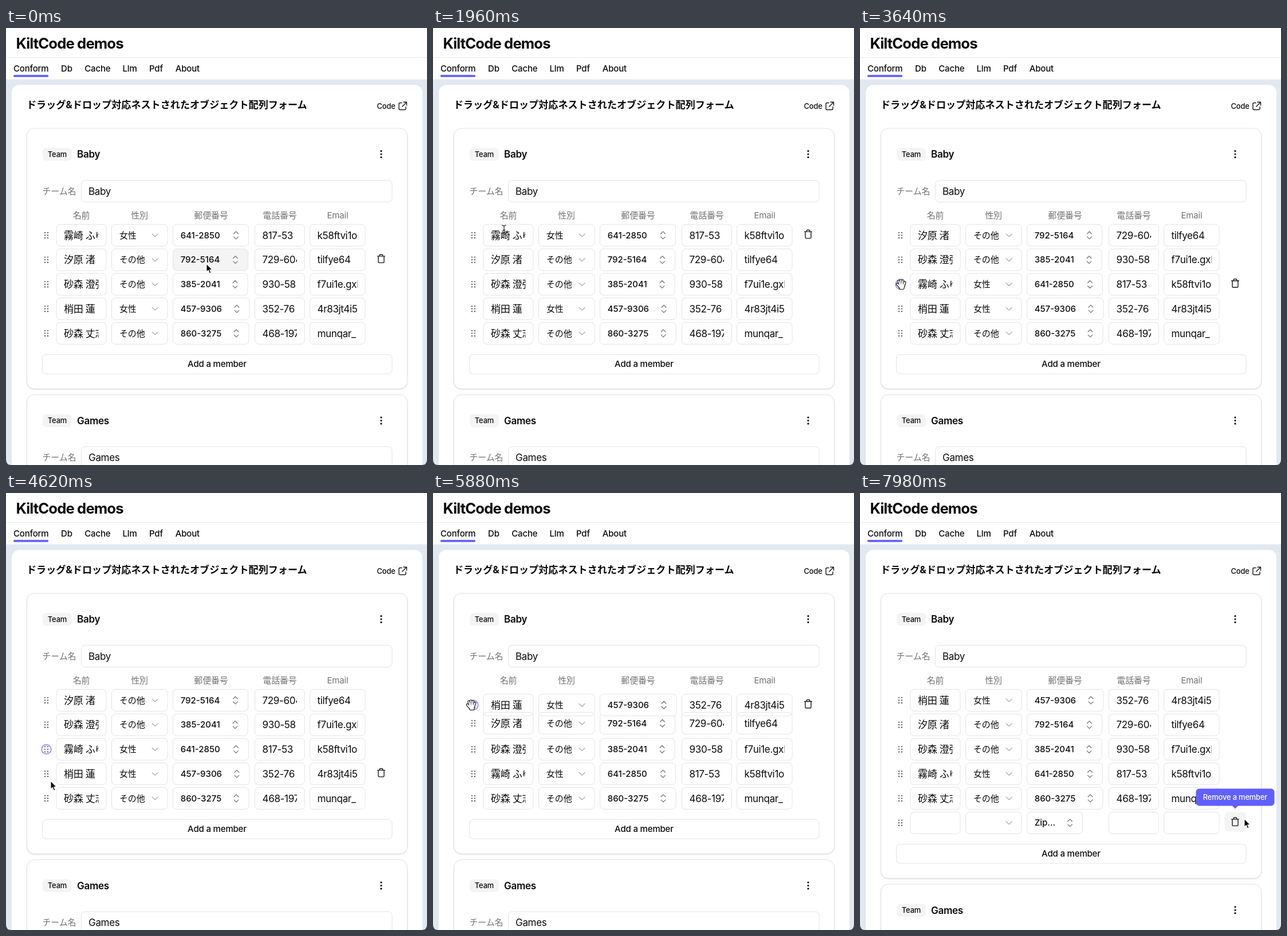
These frames come from a looping animation (735x762 px, 8000 ms). An HTML page:

```html
<!DOCTYPE html>
<html lang="ja">
<head>
<meta charset="utf-8">
<title>Sortable nested form</title>
<style>
  html, body { margin: 0; width: 100%; height: 100%; overflow: hidden; background: #e2e8f0; }
  svg { display: block; }
  text { font: 15px Inter, 'Noto Sans CJK JP', 'Noto Sans CJK', sans-serif; letter-spacing: -.012em; fill: #0a0a0a; white-space: pre; }
  .title { font-size: 25.7px; font-weight: 700; letter-spacing: -.035em; }
  .heading { font-size: 17.1px; font-weight: 700; letter-spacing: 0; }
  .team { font-size: 17.1px; font-weight: 600; letter-spacing: -.02em; }
  .value { font-size: 17.1px; letter-spacing: -.022em; }
  .medium { font-weight: 500; }
  .zip { font-weight: 500; letter-spacing: 0; }
  .small { font-size: 12.9px; font-weight: 500; }
  .label { fill: #737373; }
  .mid { text-anchor: middle; }
  .box { fill: none; stroke: #e4e4e7; }
  .button { fill: #fff; }
  .hover { fill: #f4f4f5; }
  .card { fill: #fff; stroke: #e4e4e7; filter: drop-shadow(0 1px 1px #0002); }
  .icon { fill: none; stroke: #18181b; stroke-width: 1.4; stroke-linecap: round; stroke-linejoin: round; }
  .cursor { stroke-linejoin: round; stroke-linecap: round; }
</style>
</head>
<body>
<svg id="stage" width="735" height="762" viewBox="0 0 735 762"></svg>
<script>
const LOOP = 8000, STEP = 70, PITCH = 42.75, TOP = 361.4;
const ACCENT = '#615fff', ADDED_AT = 7210;
const slotY = slot => TOP + slot * PITCH;

// Later members are painted above earlier ones.
// moves: [time, slot]; drag: [start, end] while the row follows the pointer.
const members = [
  { name: '霧崎 ふゆ', gender: '女性', zip: '641-2850', zipWidth: 132, phone: '817-53', email: 'k58ftvi1o',
    moves: [[0, 0], [3500, 2], [5465, 3]], drag: [2870, 3710], ring: [2730, 5250] },
  { name: '汐原 渚', gender: 'その他', zip: '792-5164', zipWidth: 131, phone: '729-604', email: 'tilfye64',
    moves: [[0, 1], [2980, 0], [5740, 1]] },
  { name: '砂森 澄弥', gender: 'その他', zip: '385-2041', zipWidth: 130.5, phone: '930-58', email: 'f7ui1e.gxl',
    moves: [[0, 2], [3220, 1], [5600, 2]] },
  { name: '梢田 蓮', gender: '女性', zip: '457-9306', zipWidth: 133.5, phone: '352-76', email: '4r83jt4i5',
    moves: [[0, 3], [5900, 0]], drag: [5320, 6160], ring: [5250, ADDED_AT] },
  { name: '砂森 丈志', gender: 'その他', zip: '860-3275', zipWidth: 132.5, phone: '468-197', email: 'munqar_',
    moves: [[0, 4]] },
  { name: '', gender: '', zip: 'Zip...', zipWidth: 97, phone: '', email: '', moves: [[0, 5]], from: ADDED_AT },
];

// Pointer path: [time, x, y]
const path = [
  [0, 350, 411], [420, 350, 411], [910, 245, 388], [1050, 245, 388], [1820, 126, 356], [1960, 124, 351],
  [2100, 124, 351], [2590, 72, 361.4], [2870, 72, 361.4], [3080, 72, 418], [3500, 72, 447], [3780, 72, 447],
  [3920, 73, 450], [4130, 73, 450], [4340, 82, 461], [4480, 82, 461], [4620, 78, 502], [4760, 78, 502],
  [4830, 77, 500], [4970, 77, 500], [5250, 69, 489.6], [5340, 69, 489.6], [5600, 66, 424], [5950, 67, 364],
  [6160, 68, 361.4], [6300, 74, 368], [6440, 74, 368], [6650, 232, 562], [6860, 232, 562], [7070, 300, 584],
  [7490, 300, 584], [7980, 671, 568],
];

const text = (x, y, content, cls = '') => `<text x="${x}" y="${y}" class="${cls}">${content}</text>`;
const rect = (x, y, w, h, r, cls) => `<rect x="${x}" y="${y}" width="${w}" height="${h}" rx="${r}" class="${cls}"/>`;
const icon = (d, attrs = '') => `<path class="icon" d="${d}" ${attrs}/>`;
const dots = (points, r, fill) => points.map(([x, y]) => `<circle cx="${x}" cy="${y}" r="${r}" fill="${fill}"/>`).join('');

const input = (x, w, value) => rect(x, -19, w, 38, 6.5, 'box') +
  `<svg x="${x + 13}" y="-18" width="${w - 26.5}" height="36">${text(0, 24.3, value, 'value')}</svg>`;

const teamHeader = name =>
  rect(64, 209, 51, 22.5, 6.5, 'hover') + text(89.5, 224.7, 'Team', 'small mid') +
  text(124, 226.3, name, 'team') + dots([[655, 214.6], [655, 220], [655, 225.4]], 1.6, '#0a0a0a') +
  text(63.5, 289.7, 'チーム名', 'label') + rect(131.5, 265.5, 542.5, 38, 6.5, 'box') + text(144, 290.7, name, 'value');

function memberRow(m) {
  const arrows = 291.5 + m.zipWidth - 22;
  const grip = [-4.6, 0, 4.6].flatMap(y => [[68, y], [73, y]]);
  return `<g class="row">
    <circle class="ring" cx="70.5" cy="0" r="8.3" fill="#fff" stroke="#8f88f8" stroke-width="1.7"/>
    ${dots(grip, 1.15, '#52525b')}
    ${input(88, 87, m.name)}
    ${rect(184.5, -19, 97.5, 38, 6.5, 'box')}${text(198, 5.3, m.gender)}
    ${icon('M255.2-2.3l5 4.8 5-4.8', 'style="stroke:#a1a1aa;stroke-width:1.2"')}
    ${rect(291.5, -19, m.zipWidth, 38, 6.5, 'box button zipButton')}${text(304.7, 5.3, m.zip, 'zip')}
    ${icon(`M${arrows - 3.8}-2.7l3.8-3.8 3.8 3.8m0 5.4l-3.8 3.8-3.8-3.8`, 'style="stroke:#71717a;stroke-width:1.3"')}
    ${input(434.5, 87, m.phone)}${input(530.5, 96.5, m.email)}
    <g class="trash">${rect(636.5, -19, 37.5, 34, 6.5, 'trashButton')}
      ${icon('M648.6-6.300h12.800M650-6.300v10q0 1.500 1.500 1.500h7q1.500 0 1.500-1.500v-10M652.200-6.500v-1.200q0-1.500 1.500-1.500h2.600q1.500 0 1.500 1.500v1.200')}
    </g></g>`;
}

const nav = [[13, 'Conform'], [96, 'Db'], [137.3, 'Cache'], [203.5, 'Llm'], [250, 'Pdf'], [295.8, 'About']];
const columns = [[131.5, '名前'], [233, '性別'], [358, '郵便番号'], [478, '電話番号'], [579, 'Email']];
const fingers = 'M-6.800-.5L-3 4M-4.300-6L-2.300 2M-.8-7.300L-.2 2M2.800-6.500L2 2M6.300-3.500L4 3';
const palm = 'M-3 2H4L3.200 7H-1.500z';
const stage = document.getElementById('stage');

stage.innerHTML = `
  <rect width="735" height="762" fill="#e2e8f0"/>
  <rect width="735" height="89.5" fill="#fff"/>
  <path d="M0 51.5H735" stroke="#e8eaee"/>
  ${text(17.5, 35.7, 'KiltCode demos', 'title')}
  ${nav.map(([x, label]) => text(x, 76.2, label, 'medium')).join('')}
  <rect x="13" y="81.7" width="61" height="3.9" rx="1.5" fill="${ACCENT}"/>
  <rect x="10" y="99.2" width="717" height="700" rx="13" fill="#fff"/>
  ${text(36, 140, 'ドラッグ&amp;ドロップ対応ネストされたオブジェクト配列フォーム', 'heading')}
  ${text(647.5, 141.3, 'Code', 'small')}
  ${icon('M691 130.5h-3q-2 0-2 2v8q0 2 2 2h8q2 0 2-2v-3M694 129.2h5.5v5.5M699.2 129.5l-7.4 7.4')}
  <rect id="teamCard" class="card" x="36.5" y="175" width="664" height="454" rx="13"/>
  ${teamHeader('Baby')}
  ${columns.map(([x, label]) => text(x, 332.2, label, 'label mid')).join('')}
  <g id="below">
    ${rect(63.5, 569.5, 610.5, 33.5, 6.5, 'box button addButton')}${text(368.5, 591.3, 'Add a member', 'medium mid')}
    <g transform="translate(0 464.5)"><rect class="card" x="36.5" y="175" width="664" height="454" rx="13"/>${teamHeader('Games')}</g>
  </g>
  ${members.map(memberRow).join('')}
  <g id="tooltip" fill="${ACCENT}">
    <rect x="586.5" y="515.5" width="137" height="30" rx="6"/><path d="M649.5 545h11l-5.5 5.5z"/>
    <text x="655" y="535.2" class="small mid" style="fill:#fff">Remove a member</text>
  </g>
  <path d="M0 752Q0 762 9 762H0zM735 752Q735 762 726 762H735z" fill="#36424e"/>
  <g id="pointer">
    <path class="cursor arrow" d="M0 0V14.5L3.3 11.4 5.5 16.9 7.9 15.9 5.7 10.5H10.2z" stroke="#fff" stroke-width="1.1"/>
    <path class="cursor beam" d="M-3.5-7Q0-7 0-5V5Q0 7-3.5 7M3.5-7Q0-7 0-5M0 5Q0 7 3.5 7M-2 1.5H2" fill="none" stroke="#111" stroke-width="1.2"/>
    <g class="cursor hand">
      <path d="${fingers}${palm}" stroke="#111" stroke-width="4.6"/>
      <path d="${fingers}${palm}" fill="#fff" stroke="#fff" stroke-width="2.3"/>
    </g>
  </g>`;

const find = selector => stage.querySelector(selector);
const rows = [...stage.querySelectorAll('.row')];
const show = (el, visible) => el.setAttribute('visibility', visible ? 'visible' : 'hidden');
const within = (t, range) => !!range && t >= range[0] && t < range[1];
const inside = (p, x, y, w, h) => p.x >= x && p.x <= x + w && p.y >= y && p.y <= y + h;

function pointerAt(t) {
  const next = path.findIndex(key => key[0] > t);
  if (next < 0) return { x: path.at(-1)[1], y: path.at(-1)[2] };
  const [t0, x0, y0] = path[next - 1], [t1, x1, y1] = path[next];
  const k = (1 - Math.cos(Math.PI * (t - t0) / (t1 - t0))) / 2;
  return { x: x0 + (x1 - x0) * k, y: y0 + (y1 - y0) * k };
}

function rowY(m, t, pointer) {
  if (within(t, m.drag)) return pointer.y;
  let slot = m.moves[0][1];
  for (const [start, target] of m.moves.slice(1)) {
    const k = Math.min(1, Math.max(0, (t - start) / 200));
    slot += (target - slot) * (1 - (1 - k) ** 2.3);
  }
  return slotY(slot);
}

function render(t) {
  const p = pointerAt(t), added = t >= ADDED_AT, shift = added ? PITCH : 0;
  const dragging = members.find(m => within(t, m.drag));
  let cursor = dragging ? 'hand' : 'arrow', tooltip = false;

  members.forEach((m, i) => {
    const y = rowY(m, t, p), row = rows[i], exists = !m.from || t >= m.from;
    const hovered = exists && (dragging ? dragging === m : inside(p, 62, y - PITCH / 2, 613, PITCH));
    const overTrash = hovered && inside(p, 636, y - 19, 38, 34);
    row.setAttribute('transform', `translate(0 ${y})`);
    row.style.display = exists ? '' : 'none';
    show(row.querySelector('.ring'), within(t, m.ring));
    show(row.querySelector('.trash'), hovered);
    row.querySelector('.trashButton').style.fill = overTrash ? '#f4f4f5' : 'none';
    row.querySelector('.zipButton').classList.toggle('hover', hovered && inside(p, 291, y - 19, m.zipWidth, 38));
    if (hovered && !dragging) {
      if (inside(p, 62, y - 9, 17, 18)) cursor = 'hand';
      else if ([[88, 87], [434, 87], [530, 97]].some(([x, w]) => inside(p, x, y - 19, w, 38))) cursor = 'beam';
    }
    tooltip ||= overTrash;
  });

  find('.addButton').classList.toggle('hover', inside(p, 63, 569.5 + shift, 611, 33.5));
  find('#teamCard').setAttribute('height', 454 + shift);
  find('#below').setAttribute('transform', `translate(0 ${shift})`);
  show(find('#tooltip'), tooltip);
  find('#pointer').setAttribute('transform', `translate(${p.x} ${p.y})`);
  for (const kind of ['arrow', 'beam', 'hand']) show(find('.cursor.' + kind), kind === cursor);
}

const begin = performance.now();
function tick() {
  const t = (performance.now() - begin) % LOOP;
  render(Math.floor(t / STEP) * STEP);
  requestAnimationFrame(tick);
}
tick();
</script>
</body>
</html>
```
